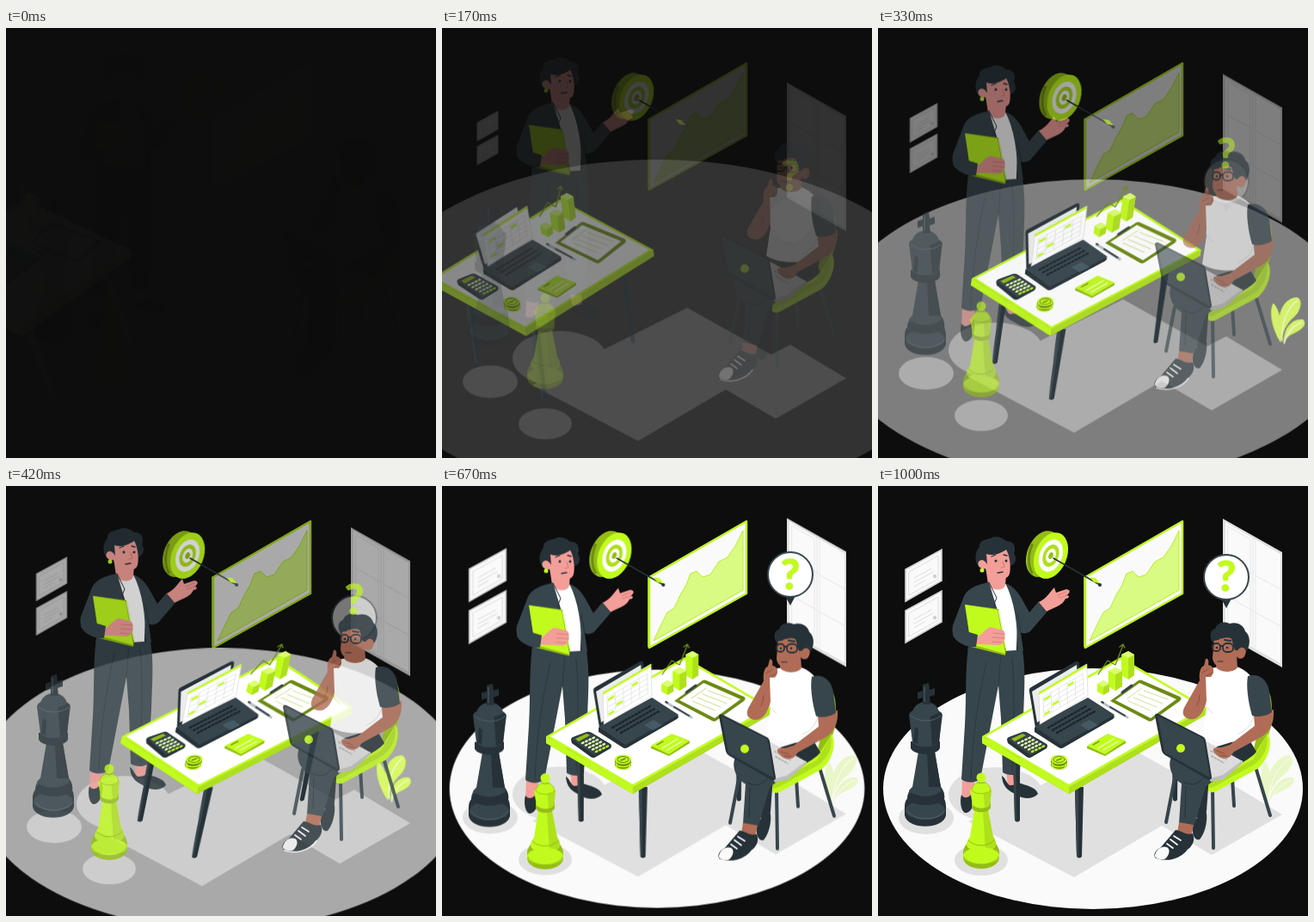
Recreate the animation shown at these times as an HTML page. Size 500 by 500 pixels, loop 1.04 s.

```html
<!DOCTYPE html>
<html lang="en">
<head>
<meta charset="utf-8">
<title>Business strategy</title>
<style>
  html, body { margin: 0; width: 100%; height: 100%; overflow: hidden; background: #0d0d0d; }
  svg { display: block; width: 100vw; height: 100vh; }

  .part { animation: .96s cubic-bezier(.36, -.01, .5, 1.38) both paused; }
  .fade { animation-name: fade; }
  .move { animation-name: move; }
  .swift { animation-name: swift; }
  .zoom { animation-name: zoom; }
  .dash { animation-name: dash; }
  .tint { animation: tint .96s linear both paused; }

  @keyframes fade { from { opacity: 0; } }
  @keyframes move { from { opacity: 0; transform: translate(var(--x, 0px), var(--y, 0px)); } }
  @keyframes swift {
    from { opacity: 0; transform: translate(var(--x, 0px), var(--y, 0px)); }
    85% { opacity: 1; }
  }
  @keyframes zoom { from { opacity: 0; transform: scale(var(--s)); } }
  @keyframes dash {
    0% { opacity: 0; transform: translateX(calc(var(--dir) * -228px)) skewX(calc(var(--dir) * 20deg)); }
    60% { opacity: 1; transform: translateX(0) skewX(calc(var(--dir) * -10deg)); }
    80% { opacity: 1; transform: translateX(0) skewX(calc(var(--dir) * 2deg)); }
    100% { opacity: 1; transform: translateX(0) skewX(0deg); }
  }
  @keyframes tint { 0%, 52% { fill: #d8f86a; } 70%, 100% { fill: #e9f6c6; } }

  .lime { fill: #c1fb1e; } .moss { fill: #94bd14; } .olive { fill: #6c8a12; }
  .navy { fill: #37454c; } .ink { fill: #263238; } .white { fill: #fff; }
  .rose { fill: #f39e98; } .tan { fill: #b06c56; } .pale { fill: #fafafa; }
  .line { fill: none; stroke-linecap: round; stroke-linejoin: round; }
  text {
    font: 700 48px Lato, "Open Sans", sans-serif; text-anchor: middle;
    stroke: #c1fb1e; stroke-width: 1.5px; stroke-linejoin: round;
  }
</style>
</head>
<body>
<svg viewBox="0 0 500 500">
  <!-- floor -->
  <g class="part zoom pale" style="--s:1.5;transform-origin:250px 352px">
    <ellipse cx="250" cy="352" rx="244" ry="140"/>
  </g>
  <g class="part move" style="--y:30px" fill="#e0e0e0">
    <ellipse cx="56" cy="386" rx="32" ry="19"/>
    <ellipse cx="120" cy="435" rx="31" ry="18"/>
    <path d="M285 300L391 359 228 455 105 390Z"/>
    <ellipse cx="137" cy="359" rx="55" ry="32"/>
    <path d="M405 343L470 382 388 429 318 388Z"/>
  </g>

  <!-- plant -->
  <g class="part dash" style="--dir:-1;transform-origin:468px 345px">
    <g class="tint">
      <path d="M453 365C449 340 459 315 478 313C486 315 481 329 472 336C461 344 456 354 453 365Z"/>
      <path d="M455 368C457 349 470 337 482 339C487 346 476 352 469 355C461 358 457 363 455 368Z"/>
      <path d="M452 366C443 348 444 328 450 320C458 329 456 350 452 366Z"/>
    </g>
    <path class="line" stroke="#fafafa" d="M454 364C456 343 465 326 478 317M456 367C461 354 470 346 480 342"/>
  </g>

  <!-- window -->
  <g class="part move" style="--y:30px">
    <path fill="#e0e0e0" d="M401 38L470 77V211L401 172Z"/>
    <path class="pale" d="M404 42L468 79V206L404 170Z"/>
    <path class="line" stroke="#e6e6e6" d="M436 60V188M439 62V190M404 84L436 102M439 104L468 120M404 127L436 145M439 147L468 163M407 47L433 62V184L407 169Z"/>
  </g>

  <!-- wall chart -->
  <g class="part fade">
    <path class="moss" d="M239 105L242 107V189L239 187Z"/>
    <path fill="#fafafa" stroke="#bff41e" stroke-width="2.5" stroke-linejoin="round" d="M241 106L354 41V125L241 188Z"/>
    <path fill="#d9fb84" stroke="#b9ee22" stroke-linejoin="round" d="M246 180L254 163 262 147 270 142 277 127 284 115 289 102 296 99 303 106 312 103 322 88 332 83 341 70 350 52V121Z"/>
  </g>

  <!-- certificates -->
  <g class="part zoom" style="--s:.5;transform-origin:53px 128px">
    <g id="certificate">
      <path fill="#fafafa" stroke="#d2d2d2" stroke-width="1.6" d="M32 97L74 74V110L32 134Z"/>
      <path class="line" stroke="#dedede" d="M36 100L70 81V108L36 127ZM42 107L62 96M42 112L64 100M42 117L54 110"/>
      <circle cx="66" cy="105" r="2.2" fill="#d0d0d0"/>
    </g>
    <use href="#certificate" y="48"/>
  </g>

  <!-- consultant -->
  <g class="part swift" style="--y:-30px">
    <path class="rose" d="M98 340H113L110 360 97 364ZM149 330H162L163 350 151 350Z"/>
    <path class="ink" d="M97 359C101 365 108 362 111 354C115 367 109 381 101 380C96 377 95 366 97 359ZM144 337C148 339 149 345 153 348C158 348 162 347 163 345C172 348 184 350 186 358C180 365 168 364 161 359C154 355 145 352 144 337Z"/>
    <path class="navy" d="M105 187L168 191C172 214 170 239 169 270L165 333C159 338 150 336 145 333L143 270 140 232 130 284 119 341C112 346 102 345 97 341L101 278C103 245 101 216 105 187Z"/>
    <path class="line" stroke="#2b383f" d="M140 232L143 194M126 205C116 250 110 290 108 340M156 200C160 240 157 290 156 330"/>
    <path class="white" d="M127 114L149 114 163 134 161 191 128 193Z"/>
    <path class="ink" d="M117 94C110 84 115 74 118 71C117 63 126 62 130 61C138 56 146 61 149 64C158 63 161 72 158 78C163 86 158 92 153 93L121 94Z"/>
    <path class="rose" d="M125 94L149 103 148 115C146 123 131 122 128 114Z"/>
    <path class="navy" d="M129 112C118 114 105 118 100 128L87 162C84 177 94 185 106 184L104 191C118 197 134 200 144 198L143 158Z"/>
    <path class="navy" d="M148 113C156 116 161 121 166 129L176 147 187 134 196 147 177 169C171 173 167 171 166 170L169 192 162 193C163 160 158 132 148 113Z"/>
    <path class="line" stroke="#263238" d="M129 112L138 130 135 137 143 158M166 170L162 148M105 160L113 149"/>
    <path class="rose" d="M187 135C196 131 201 122 205 118L207 124 219 120C224 121 224 124 219 127C224 127 222 131 218 131C215 139 203 142 196 146Z"/>
    <path class="line" stroke="#d97f7a" d="M209 127L219 123M210 130L220 127"/>
    <path class="moss" d="M102 138L140 143 149 190 148 197 108 187Z"/>
    <path class="lime" d="M101 138L139 144 148 195 108 184Z"/>
    <path class="line" stroke="#effac8" stroke-width="2" d="M141 146L149 188"/>
    <path class="rose" d="M115 176C120 174 124 166 131 164L146 168C149 173 148 183 141 185L121 184 114 184Z"/>
    <path class="navy" d="M90 165L116 173 114 187C103 188 94 183 87 174Z"/>
    <path class="line" stroke="#d97f7a" d="M134 171L147 172M133 176L147 177M133 181L144 182"/>
    <path class="rose" d="M126 79C134 82 143 78 149 74C153 80 155 94 153 102C151 109 141 109 136 107C130 104 126 99 125 96C118 98 114 90 118 87C122 84 125 88 127 91Z"/>
    <path class="line" stroke="#263238" stroke-width="1.3" d="M132 82L137 80M146 80L150 81M139 101L145 100"/>
    <path class="line" stroke="#d97f7a" stroke-width="1.2" d="M145 88L147 94 143 95"/>
    <circle class="ink" cx="137" cy="87" r="1.5"/><circle class="ink" cx="149" cy="87" r="1.5"/>
    <circle class="lime" cx="121" cy="98" r="2.5"/>
  </g>

  <!-- target and dart -->
  <g class="part swift" style="--x:30px">
    <g transform="translate(192 79) rotate(22)">
      <ellipse class="moss" rx="18.5" ry="28"/>
      <path class="line" stroke="#6c8a12" stroke-width="3" d="M-16 -5C-16 8 -11 19 -4 25"/>
    </g>
    <g transform="translate(201 81) rotate(22)">
      <path class="moss" d="M-9 -24L0 -28 0 28 -8 26Z"/>
      <ellipse class="lime" rx="18.500" ry="28"/>
      <ellipse class="white" rx="13" ry="19.500"/>
      <ellipse fill="#aee01c" rx="9" ry="13.500"/>
      <ellipse class="white" rx="5.500" ry="8.500"/>
      <ellipse class="moss" rx="2.500" ry="4"/>
    </g>
    <path class="line" stroke="#263238" stroke-width="1.6" d="M204 84L258 115"/>
    <path class="lime" d="M246 106L253 107 258 113 251 112Z"/>
    <circle class="ink" cx="258" cy="115" r="2"/>
  </g>

  <!-- desk -->
  <g class="part dash" style="--dir:1;transform-origin:252px 300px">
    <path class="ink" d="M157 312H165L165 389Q162 392 159 389ZM341 275H349L348 365Q345 368 343 365ZM229 350H239L237 431Q234 434 231 431Z"/>
    <path class="navy" d="M157 312H160L161 389 159 389ZM229 350H233L233 431 231 431Z"/>
    <path class="moss" d="M121 291L222 350 383 258V265L222 358 121 299Z"/>
    <path class="lime" d="M121 291L222 350V358L121 299Z"/>
    <path fill="#aee01c" d="M222 350L383 258V265L222 358Z"/>
    <path class="lime" d="M121 291L282 199 383 258 222 350Z"/>
    <path class="white" d="M126 291L282 202 378 258 222 347Z"/>

    <g class="lime">
      <path d="M255 230L262 226 269 230V239L262 243 255 239ZM268 215L276 211 284 215V233L276 238 268 233ZM283 196L291 192 298 196V220L291 225 283 220Z"/>
      <path fill="#aee01c" d="M262 234L269 230V239L262 243ZM276 219L284 215V233L276 238ZM291 200L298 196V220L291 225Z"/>
      <path fill="#daff72" d="M255 230L262 226 269 230 262 234ZM268 215L276 211 284 215 276 219ZM283 196L291 192 298 196 291 200Z"/>
    </g>
    <path class="line" stroke="#6c8a12" stroke-width="1.3" d="M256 219L267 203 276 208 285 185M281 187L285 184 287 188"/>

    <path class="olive" d="M270 250L303 226Q305 225 307 226L351 245Q354 247 351 250L320 272Q317 275 314 273Z"/>
    <path class="white" d="M276 249L304 229 347 248 317 270Z"/>
    <path class="line" stroke="#d5df9e" d="M290 247L307 235M291 250L317 261M297 246L324 257M303 242L331 253M309 238L337 248"/>
    <path class="line" stroke="#37454c" stroke-width="3" d="M284 240L295 232"/>
    <path class="line" stroke="#b8c2c6" stroke-width="3" d="M261 252L290 269"/>
    <path class="line" stroke="#37454c" stroke-width="2" d="M270 257L287 267M260 251L262 252"/>

    <path class="ink" d="M176 239Q175 236 178 234L230 204Q234 203 234 207L235 243 183 281Z"/>
    <path fill="#ededed" d="M179 239L231 208 233 240 185 275Z"/>
    <path class="ink" d="M182 281L244 247 274 266Q276 269 273 271L216 304Q213 306 210 304L182 286Z"/>
    <path class="navy" d="M182 280L244 246 275 266 213 301Z"/>
    <path class="line" stroke="#1b252a" stroke-width="2.4" stroke-dasharray="1.8 2.6" d="M198 281L242 256M203 284L247 259M208 287L252 262"/>
    <path fill="#455a64" d="M235 278L246 272 256 278 245 284Z"/>
    <g transform="matrix(.93 -.55 .03 .95 187 240)">
      <path class="white" stroke="#d9d9d9" stroke-width=".7" d="M0 0H60V39H0Z"/>
      <path class="lime" d="M0 0H60V3H0Z"/>
      <path class="line" stroke="#dde0e0" stroke-width=".7" d="M5 9H55M5 15H55M5 21H55M5 27H55M5 33H55M5 9V33M15 9V33M25 9V33M35 9V33M45 9V33M55 9V33"/>
      <path class="lime" d="M6 11H14V14H6ZM16 23H24V26H16ZM36 11H43V14H36ZM6 29H13V32H6Z"/>
    </g>

    <path class="ink" d="M150 295Q150 293 152 292L168 286Q171 285 174 287L196 300Q198 302 196 305L179 315Q176 317 173 315L151 299Z"/>
    <path class="navy" d="M151 294L170 286 197 302 177 313Z"/>
    <path class="moss" d="M155 294L168 288 172 290 159 297Z"/>
    <g class="line" stroke="#e8ffac" stroke-width="2.4" stroke-dasharray="1.6 3">
      <path d="M163 299L178 292M167 301.500L182 294.500M171 304L186 297M175 306.500L190 299.500"/>
      <path stroke="#c1fb1e" d="M179 309L194 302"/>
    </g>

    <path class="olive" d="M201 318H220V325C217 331 204 331 201 325Z"/>
    <path class="line" stroke="#c1fb1e" stroke-width="1.6" d="M202 322C204 328 217 328 220 322M202 325C205 331 217 331 219 325"/>
    <ellipse class="lime" cx="210.500" cy="318" rx="9.500" ry="5.500"/>
    <ellipse class="line" stroke="#6c8a12" cx="210.500" cy="318" rx="6.500" ry="3.500"/>
    <path class="line" stroke="#6c8a12" stroke-width="1.5" d="M208 319L213 317"/>

    <path class="moss" d="M243 303L268 289 288 297V299L264 314 243 305Z"/>
    <path class="lime" d="M243 302L267 288 288 296 264 312Z"/>
    <path class="line" stroke="#6c8a12" stroke-width="1.3" d="M250 301L257 297"/>
    <path class="line" stroke="#f0ffc6" stroke-width="1.4" d="M256 305L274 294M262 307L279 297"/>
  </g>

  <!-- dark king -->
  <g class="part swift" style="--y:-30px">
    <path class="ink" d="M31 373C31 365 35 363 37 359L74 359C77 363 79 366 79 373V383C76 400 34 400 31 383Z"/>
    <path class="navy" d="M47 309H66L73 350C76 354 78 359 77 364C68 373 42 373 34 364C34 358 36 354 40 350Z"/>
    <path class="ink" d="M57 309H66L73 350C76 354 78 359 77 364C73 368 66 370 60 371Z"/>
    <ellipse class="navy" cx="55" cy="377" rx="23" ry="11"/>
    <ellipse class="ink" cx="55.500" cy="362" rx="21" ry="9"/>
    <path class="navy" d="M36 354C44 363 66 363 74 354L72 350H40Z"/>
    <path class="ink" d="M38 297H72V305C68 314 42 314 38 305Z"/>
    <path class="navy" d="M36 266C39 255 71 255 75 266L71 298C64 305 46 305 40 298Z"/>
    <path class="ink" d="M60 260L74 264 71 298 63 302ZM43 280L47 283 46 300 41 298Z"/>
    <path class="navy" d="M40 263C43 247 68 247 71 263C62 270 48 270 40 263Z"/>
    <path class="ink" d="M52 231L59 229 60 237 66 235V243L60 245 61 254 52 254 52 246 46 248 46 240 52 238Z"/>
    <path class="line" stroke="#52636b" d="M38 267C48 275 64 275 73 267M34 378C43 390 68 390 77 378M54 234V251"/>
  </g>

  <!-- lime king -->
  <g class="part swift" style="--y:-30px">
    <path class="moss" d="M99 427C99 419 103 418 104 414H136C138 418 141 420 141 427V433C138 449 102 449 99 433Z"/>
    <path class="lime" d="M112 377H128L134 408C137 412 138 416 136 420C128 427 111 427 104 420C102 416 104 412 107 408Z"/>
    <path fill="#aee01c" d="M122 377H128L134 408C137 412 138 416 136 420L125 425Z"/>
    <ellipse class="lime" cx="120" cy="430" rx="21" ry="10"/>
    <path class="line" stroke="#94bd14" d="M105 412C113 420 127 420 135 412M100 431C106 443 134 443 140 431"/>
    <path class="moss" d="M109 367H131V374C128 381 112 381 109 374Z"/>
    <path class="lime" d="M107 354C111 348 129 348 132 354L130 371C124 376 116 376 110 371Z"/>
    <path fill="#aee01c" d="M122 350L132 354 130 371 124 374Z"/>
    <path class="lime" stroke="#94bd14" stroke-width=".8" d="M109 354C110 341 130 341 131 354C125 359 115 359 109 354Z"/>
    <circle class="lime" cx="120" cy="339" r="5.500"/>
    <path class="line" stroke="#94bd14" d="M115 344Q120 348 125 344"/>
  </g>

  <!-- speech bubble -->
  <g class="part move" style="--y:140px">
    <g class="part fade">
      <path class="ink" d="M398 129H412L405 142Z"/>
      <circle class="white" cx="405" cy="106" r="26" stroke="#37454c" stroke-width="2"/>
    </g>
  </g>

  <!-- client on chair -->
  <g class="part swift" style="--y:-30px">
    <path class="line" stroke="#37454c" stroke-width="4" d="M345 340L335 391M389 350L390 421M440 330L456 383M412 340L414 372"/>
    <path class="moss" d="M452 237C458 241 459 256 457 280L446 315 436 310Z"/>
    <path class="lime" d="M453 288C460 298 453 320 441 329L393 355C387 358 382 355 381 349L439 310Z"/>
    <path fill="#aee01c" d="M381 348L436 318 452 290C455 301 449 316 437 324L392 349C387 352 383 351 381 348Z"/>
    <path class="ink" d="M366 392L380 375C384 380 383 400 374 411 369 413 364 406 366 392Z"/>
    <path class="ink" d="M352 316L430 292 440 309C431 321 402 332 385 336L382 378C378 386 372 388 366 383Z"/>
    <path class="navy" d="M342 313C360 304 402 304 416 314C409 333 388 343 381 350L368 394C363 398 355 396 350 392L353 346C340 338 336 323 342 313Z"/>
    <path class="line" stroke="#263238" d="M355 344C366 350 373 346 380 338M358 350L357 385"/>
    <path class="tan" d="M350 391L367 394 364 407 348 403Z"/>
    <path class="ink" d="M346 400C352 400 358 407 366 404C369 412 366 418 360 423C351 436 334 438 323 433C319 429 323 423 329 420Z"/>
    <path class="pale" d="M322 429C324 422 330 418 336 420 341 423 338 431 333 434Q326 435 322 431Z"/>
    <path class="line" stroke="#fafafa" stroke-width="1.7" d="M336 416L343 421M340 411L348 417M344 407L352 412M324 434C336 438 352 435 361 423"/>

    <path class="white" d="M392 211C382 212 378 221 379 231L382 257 377 290C391 300 424 300 439 290L437 268 441 230C433 219 426 213 417 210Z"/>
    <path class="line" stroke="#dcdcdc" d="M382 257L389 264M437 268C433 280 427 285 419 288"/>
    <path class="tan" d="M395 197L417 196 418 211C413 218 398 217 393 211Z"/>
    <path class="tan" d="M381 222L382 250C379 264 371 273 362 271C354 269 353 263 357 256L374 226C373 217 375 210 379 209L381 201C384 200 385 204 384 208C391 209 392 217 387 222Z"/>
    <path class="line" stroke="#8c5141" d="M377 217L384 213M382 221L389 217M371 255Q374 249 374 243"/>
    <path class="ink" d="M391 184C384 177 386 167 392 166C394 158 404 157 409 160C418 157 426 163 427 169C434 174 433 188 427 194L418 198Z"/>
    <path class="tan" d="M391 178C400 179 407 173 413 179L418 191C423 184 430 190 427 196C425 203 418 201 417 198C416 207 409 212 402 212C394 211 389 206 389 199Z"/>
    <path class="ink" d="M410 174L420 178 419 191 415 191Z"/>
    <g class="line" stroke="#263238" stroke-width="1.8">
      <rect x="389" y="183" width="9" height="9" rx="4"/><rect x="401" y="183" width="12" height="10" rx="4.500"/>
      <path d="M398 186H401M413 186L420 188M390 179L396 178M403 179L410 180"/>
      <path stroke-width="1.2" d="M395 204L401 204"/>
    </g>
    <circle class="ink" cx="394" cy="188" r="1.300"/><circle class="ink" cx="406" cy="188" r="1.300"/>

    <path fill="#dcdcdc" d="M380 296L424 320 401 339 386 343Z"/>
    <path fill="#bdbdbd" d="M386 340L401 336 424 319V322L402 341 387 344Z"/>
    <path class="line" stroke="#aaa" stroke-width="1.5" stroke-dasharray="2 2" d="M387 308L405 318M388 314L402 322"/>
    <path class="ink" d="M322 267Q322 264 326 265L377 291Q380 292 381 296L388 338Q388 343 383 341L334 313Q331 311 330 308Z"/>
    <path class="navy" d="M325 267L377 293Q379 294 379 297L386 339 333 310Z"/>
    <circle class="lime" cx="352" cy="305" r="5"/>
    <path class="tan" d="M437 266L460 260C461 274 457 284 447 291L414 309 409 315C402 319 395 316 390 308C389 304 393 304 399 304L409 301 438 279Z"/>
    <path class="line" stroke="#8c5141" d="M394 308L403 311M398 313L406 314"/>
    <path class="navy" d="M430 221C444 217 453 226 455 239L458 263C451 268 441 269 435 267C430 250 428 232 430 221Z"/>
  </g>

  <g class="part move lime" style="--y:80px"><text x="405" y="122">?</text></g>
</svg>
<script>
  const LOOP = 1040, STEPS = 25, SLACK = 5;
  const parts = document.getAnimations();
  const start = performance.now();

  // The picture is held for each of the 25 steps.
  function draw() {
    const time = (performance.now() - start) % LOOP;
    const step = Math.min(STEPS, Math.floor((time + SLACK) * STEPS / LOOP) + 1);
    for (const part of parts) part.currentTime = step * 1000 / STEPS;
    requestAnimationFrame(draw);
  }
  draw();
</script>
</body>
</html>
```
